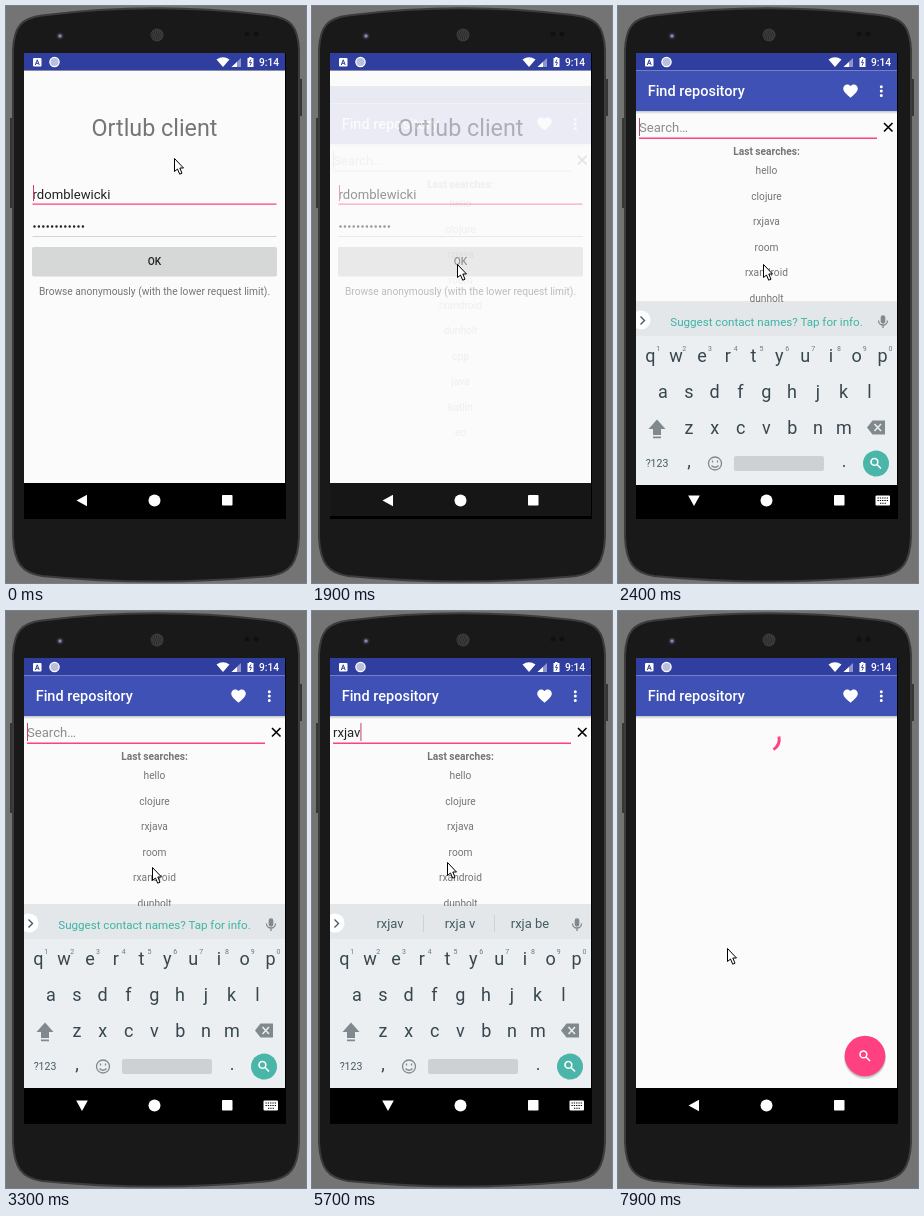
Animation, 300 px wide and 577 px high, one loop 8 s. Source, as an HTML page:

```html
<!DOCTYPE html>
<html lang="en">
<head>
<meta charset="utf-8">
<title>Repository client demo</title>
<style>
html, body { margin: 0; width: 100%; height: 100%; overflow: hidden; background: #747474; }
svg { display: block; width: 100vw; height: 100vh; }
text { font-family: Roboto, sans-serif; font-size: 10.2px; fill: #757575; white-space: pre; }
.mid { text-anchor: middle; }
.edit { font-size: 13.1px; fill: #212121; }
.key { font-size: 18px; fill: #37474f; text-anchor: middle; }
.digit { font-size: 7px; fill: #607d8b; text-anchor: middle; }
.word { font-size: 13px; fill: #455a64; text-anchor: middle; }
</style>
</head>
<body>
<svg viewBox="0 0 300 577">
  <defs>
    <clipPath id="screenClip"><path d="M18 47H280V513H18z"/></clipPath>
    <linearGradient id="shade" x2="0" y2="1">
      <stop stop-opacity=".22"/><stop offset="1" stop-opacity="0"/>
    </linearGradient>
    <g id="lens" fill="none" stroke="#fff" stroke-width="1.6">
      <circle cx="-1.6" cy="-1.6" r="3.4"/><path d="M1 1L5 5"/>
    </g>
  </defs>

  <!-- phone -->
  <rect width="300" height="577" fill="#747474"/>
  <path d="M292 73h4v37h-4zM4 112h4v90h-4z" fill="#363636"/>
  <path d="M7 44C8 20 16 12 36 9.500Q150 -5 264 9.500C284 12 292 20 293 44V531C292 557 284 567 264 570Q150 581 36 570C16 567 8 557 7 531z" fill="#191919" stroke="#3c3c3c" stroke-width="2"/>
  <circle cx="54" cy="30" r="3.6" fill="#2b2c36"/><circle cx="54" cy="30" r="1.8" fill="#8088b4"/>
  <circle cx="151" cy="29" r="6.5" fill="#3b3b3b"/>
  <path d="M146 27h10M145 29h12M146 31h10M148 25h6M148 33h6" stroke="#222" stroke-dasharray="1 1"/>
  <circle cx="241" cy="28" r="2.5" fill="#101010"/><circle cx="250" cy="28" r="2.5" fill="#101010"/>
  <path d="M18 47H280V513H18z"/>

  <g clip-path="url(#screenClip)">
    <path d="M18 47H279V64.500H18z" fill="#303f9f"/>
    <path d="M18 64.500H279V477H18z" fill="#fbfbfb"/>

    <g id="login">
      <text class="mid" x="148.5" y="130" style="font-size:23.3px">Ortlub client</text>
      <text class="edit" x="26.5" y="193">rdomblewicki</text>
      <path id="loginCaret" d="M27.5 179V195" stroke="#c04070"/>
      <path d="M26.500 198.200H270.500" stroke="#ff4081" stroke-width="1.300"/>
      <path d="M28.500 220.500H78" stroke="#212121" stroke-width="2.500" stroke-linecap="round" stroke-dasharray="0 4.400"/>
      <path d="M26.500 230.500H270.500" stroke="#ccc" stroke-width=".8"/>
      <rect x="26" y="242" width="245" height="28.500" rx="2" opacity=".15"/>
      <rect id="okButton" x="26" y="241" width="245" height="28" rx="1.500"/>
      <text class="mid" x="148.500" y="258.700" style="fill:#212121;font-weight:500">OK</text>
      <text class="mid" x="148.500" y="289">Browse anonymously (with the lower request limit).</text>
    </g>

    <g id="finder">
      <path d="M18 47H279V64.500H18z" fill="#303f9f"/>
      <path d="M18 64.500H279V477H18z" fill="#fbfbfb"/>
      <path d="M18 477H280V520H18z"/>
      <path d="M18 64.500H279V105H18z" fill="#3f51b5"/>
      <path d="M18 105H279V108H18z" fill="url(#shade)"/>
      <text x="29.700" y="90.300" style="font-size:14.500px;font-weight:500;fill:#fff">Find repository</text>
      <path transform="translate(223.800 76.300) scale(.727)" fill="#fff" d="M12 21.350l-1.450-1.320C5.400 15.360 2 12.280 2 8.500 2 5.420 4.420 3 7.500 3c1.740 0 3.410.810 4.500 2.090C13.090 3.810 14.760 3 16.500 3 19.580 3 22 5.420 22 8.500c0 3.780-3.400 6.860-8.550 11.540z"/>
      <path d="M263.300 80.700V91" stroke="#fff" stroke-width="3" stroke-linecap="round" stroke-dasharray="0 4.400"/>
      <g id="query">
        <text id="typed" class="edit" x="21" y="126"></text>
        <path id="caret" d="M0 112V130" stroke="#c04070"/>
        <path id="queryLine" d="M21 132.300H259"/>
        <path d="M266 117L274.500 125.500M274.500 117L266 125.500" stroke="#000" stroke-width="1.600"/>
        <text class="mid" x="148.500" y="149" font-weight="700">Last searches:</text>
        <g id="history"></g>
      </g>
      <g id="fab">
        <circle cy="2" r="21" opacity=".12"/><circle cy="1" r="20.500" opacity=".15"/>
        <circle r="20.300" fill="#ff4081"/><use href="#lens"/>
      </g>
    </g>

    <circle id="spinner" r="12.700" fill="none" stroke="#ff4081" stroke-width="2.900" pathLength="1"/>

    <g id="keyboard">
      <path d="M18 293H279V295H18z" opacity=".08"/>
      <path d="M18 295H279V477H18z" fill="#eceff1"/>
      <path d="M18 295H279V328H18z" fill="#e3e7ea"/>
      <path d="M18 477H280V520H18z"/>
      <circle cx="23" cy="312" r="9.500" fill="#fff"/>
      <path d="M22.500 308.500L26.500 312.500L22.500 316.500" fill="none" stroke="#455a64" stroke-width="1.400"/>
      <text id="tip" class="mid" x="148.500" y="317.500" style="font-size:11.600px;fill:#3cb4a4">Suggest contact names? Tap for info.</text>
      <g id="words">
        <path d="M111.500 304V321M182.500 304V321" stroke="#cdd2d5"/>
        <text class="word" x="78" y="317"></text><text class="word" x="148" y="317"></text><text class="word" x="218" y="317"></text>
      </g>
      <g fill="none" stroke="#80898e" stroke-width="1.300">
        <rect x="263.300" y="308" width="3.400" height="7" rx="1.700" fill="#80898e"/>
        <path d="M260.500 312.500a4.500 4.500 0 0 0 9 0M265 317v3"/>
        <circle cx="97" cy="455.500" r="6.500"/><path d="M93.500 457.500q3.500 3.500 7 0M94.500 452.500v2M99.500 452.500v2"/>
      </g>
      <g id="keys"></g>
      <path d="M39 411.500L47.500 421H43V427H35V421H30.500zM35 428.500h8v1.800h-8z" fill="#80898e"/>
      <path d="M249 419.500L254.500 412.500H267V426.500H254.500z" fill="#80898e"/>
      <path d="M256.500 416L263 423M263 416L256.500 423" stroke="#eceff1" stroke-width="1.500"/>
      <text class="mid" x="39" y="459" style="font-size:10.500px;fill:#455a64">?123</text>
      <text class="key" x="71" y="459">,</text><text class="key" x="226" y="459">.</text>
      <rect x="116" y="448" width="90" height="15" rx="2" fill="#cdd1d4"/>
      <circle id="go" cx="258" cy="455.500" r="13"/>
      <use href="#lens" x="258" y="455.500"/>
      <circle id="ripple" cx="256" cy="455.500" r="8.500" fill="#b8eee6" opacity=".6"/>
    </g>

    <!-- status and navigation icons -->
    <rect x="27" y="52" width="8.500" height="8.500" rx="1" fill="#fff"/>
    <path d="M29.300 59L31.250 53.800L33.200 59M30 57.300H32.500" fill="none" stroke="#303f9f"/>
    <circle cx="48.500" cy="56" r="4.600" fill="#b9bfdd" stroke="#fff" stroke-width="1.300"/>
    <path d="M210.500 53.500Q217 49 223.500 53.500L217 61z" fill="#fff"/>
    <path d="M235 52V61H225.500z" fill="#fff" opacity=".45"/><path d="M231 56V61H225.500z" fill="#fff"/>
    <path d="M241.500 52H243V51H245.500V52H247.500V61H241.500z" fill="#fff"/>
    <path d="M245 53.500L243.500 56.500H245.500L244 59.500" fill="none" stroke="#303f9f" stroke-width=".9"/>
    <text x="253" y="60" style="fill:#fff;font-weight:500">9:14</text>
    <g fill="#fff">
      <path id="back" d="M-5.500 0L5 -5.800V5.800z"/>
      <circle cx="148.500" cy="494.500" r="6"/>
      <rect x="216" y="489" width="10.500" height="10.500" rx=".8"/>
      <g id="imeIcon"><rect x="257.500" y="489.500" width="14.500" height="10" rx="1"/>
        <path d="M259.500 492H270.500M259.500 494.500H270.500M262 497.300H268" stroke="#000" stroke-width="1.100" stroke-dasharray="1.300 1"/></g>
    </g>
  </g>

  <path id="pointer" d="M.5 .5V13.500L3.500 11L5.700 16.200L8 15.200L5.800 10H9.500z" fill="#fff" stroke="#000" stroke-linejoin="round"/>
</svg>

<script>
const LOOP = 8000, STEP = 100;
const PATH = [[0, 168, 152], [100, 168, 152], [700, 145, 258], [3200, 145, 258], [3500, 150, 251],
  [3700, 150, 251], [3800, 135, 251], [6100, 135, 251], [6500, 254, 452], [7600, 254, 452], [7900, 109, 337], [LOOP, 109, 337]];
const QUERY = 'rxjava';
const KEY_TIMES = [4600, 5000, 5200, 5400, 5700, 5900];
const WORDS = { 4: ['rxja', 'rxja a', 'roja'], 5: ['rxjav', 'rxja v', 'rxja be'], 6: ['rxjava', 'rxja a', 'rxja and'] };
const HISTORY = ['hello', 'clojure', 'rxjava', 'room', 'rxandroid', 'dunholt', 'cpp', 'java', 'kotlin', 'eo'];
const ROWS = [['qwertyuiop', 32.3, 353.5], ['asdfghjkl', 45, 390], ['zxcvbnm', 71, 426]];

const $ = id => document.getElementById(id);
const set = (id, attrs) => { for (const k in attrs) $(id).setAttribute(k, attrs[k]); };
const show = (id, on) => { $(id).style.display = on ? '' : 'none'; };
const ramp = (t, from, length) => Math.min(1, Math.max(0, (t - from) / length));
const label = (cls, x, y, s) => `<text class="${cls}" x="${x}" y="${y}">${s}</text>`;

$('history').innerHTML = HISTORY.map((s, i) => label('mid', 148.5, 168.3 + 25.45 * i, s)).join('');
$('keys').innerHTML = ROWS.map(([chars, x0, y], row) => [...chars].map((c, i) => {
  const x = x0 + 25.8 * i;
  return label('key', x, y, c) + (row ? '' : label('digit', x + 8, 342.5, (i + 1) % 10));
}).join('')).join('');

// Material "fast out, slow in": cubic-bezier(.4, 0, .2, 1)
function ease(x) {
  let lo = 0, hi = 1, s = 0.5;
  for (let i = 0; i < 20; i++) {
    s = (lo + hi) / 2;
    const bx = 1.2 * (1 - s) ** 2 * s + 0.6 * (1 - s) * s * s + s ** 3;
    if (bx < x) lo = s; else hi = s;
  }
  return 3 * (1 - s) * s * s + s ** 3;
}

function spin(age, y) {
  const p = age / 1333 % 1;
  const start = 0.75 * ease(Math.max(0, 2 * p - 1));
  const end = 0.75 * ease(Math.min(1, 2 * p));
  const angle = 360 * (start + p / 4) + 720 * age / 4444 - 90;
  set('spinner', {
    transform: `translate(148.5 ${y}) rotate(${angle})`,
    'stroke-dasharray': `${end - start + 0.02} 1`
  });
}

function movePointer(t) {
  const i = PATH.findIndex(k => k[0] > t);
  const [t0, x0, y0] = PATH[i - 1], [t1, x1, y1] = PATH[i];
  const p = (t - t0) / (t1 - t0), e = p * p * (3 - 2 * p);
  const at = (a, b) => Math.round(a + (b - a) * e);
  set('pointer', { transform: `translate(${at(x0, x1)} ${at(y0, y1)})` });
}

function drawQuery(t) {
  const count = KEY_TIMES.filter(k => k <= t).length;
  const blink = from => Math.floor((t - from) / 500) % 2 === 0;
  const typed = $('typed');
  typed.textContent = count ? QUERY.slice(0, count) : 'Search…';
  typed.style.fill = count ? '#212121' : '#8c8c8c';
  const caretX = 21.5 + (count ? typed.getComputedTextLength() : 0);
  set('caret', { transform: `translate(${caretX})` });
  show('caret', count ? blink(KEY_TIMES[count - 1]) : t < 2500 || !blink(2500));
  const focused = t >= 2200;
  set('queryLine', { stroke: focused ? '#ff4081' : '#8a8080', 'stroke-width': focused ? 1.5 : 0.9 });

  const words = WORDS[count];
  show('tip', !words);
  show('words', words);
  if (words) $('words').querySelectorAll('text').forEach((el, i) => { el.textContent = words[i]; });
}

function draw(t) {
  const searching = t >= 7000;
  movePointer(t);

  set('login', { opacity: t < 900 ? 1 : 0.5 });
  set('okButton', { fill: t === 800 ? '#c6c7c7' : '#d6d7d7' });
  show('loginCaret', Math.floor((t + 300) / 500) % 2 === 0);

  const enter = ramp(t, 1880, 350);
  show('finder', enter > 0);
  set('finder', {
    transform: `translate(0 ${37 * (1 - enter) ** 2})`,
    opacity: ramp(t, 1880, 227)
  });
  show('query', !searching);
  drawQuery(t);

  const pop = ramp(t, 6950, 200);
  show('fab', searching);
  set('fab', { transform: `translate(247 445) scale(${pop})` });

  show('spinner', (t >= 900 && t < 1900) || searching);
  if (searching) spin(t - 6900, 128);
  else spin(Math.max(0, t - 870), 271);

  const raised = ramp(t, 2250, 200) * (1 - ramp(t, 6980, 200));
  show('keyboard', raised > 0);
  set('keyboard', { transform: `translate(0 ${32 * (1 - raised) ** 2})`, opacity: Math.min(1, raised * 1.34) });
  set('go', { fill: t < 6800 ? '#4ab5a9' : '#1fa294' });
  show('ripple', t >= 6800);

  const imeOpen = t >= 2300 && t < 7100;
  set('back', { transform: `translate(76 494.5) rotate(${imeOpen ? -90 : 0})` });
  show('imeIcon', imeOpen);
}

function tick(now) {
  draw(Math.floor(now / STEP) * STEP % LOOP);
  requestAnimationFrame(tick);
}
requestAnimationFrame(tick);
</script>
</body>
</html>
```
